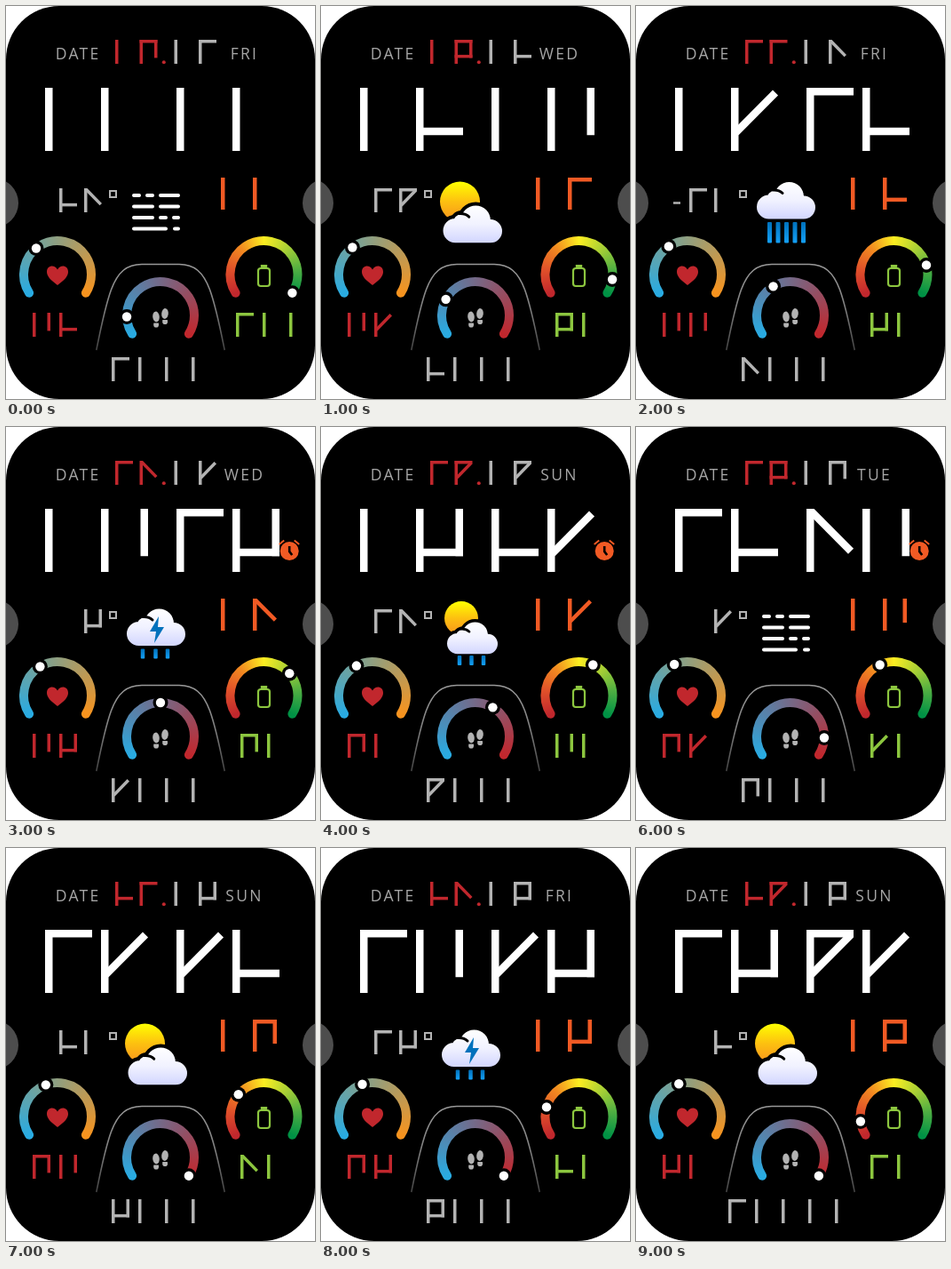
Write an HTML page with a canvas that moves like this. It is 348 px wide and 442 px high and loops after 10 s.

```html
<!DOCTYPE html>
<html lang="en">
<head>
<meta charset="utf-8">
<title>Cipher watch face</title>
<style>
  html, body { margin: 0; width: 100%; height: 100%; overflow: hidden; background: #fff; }
  canvas { display: block; width: 348px; height: 442px; }
</style>
</head>
<body>
<canvas id="face"></canvas>
<script>
const W = 348, H = 442, STEP = 1000, STEPS = 10;
const RED = '#c1272d', GREY = '#b3b3b3', ORANGE = '#f15a24', GREEN = '#8cc63f', BLUE = '#29abe2';
const TEMPS = [23, 15, -10, 8, 13, 7, 4, 20, 18, 2];
const WEATHER = ['fog', 'sun', 'downpour', 'storm', 'sunRain', 'sun', 'fog', 'sun', 'storm', 'sun'];
const DAYS = ['SUN', 'MON', 'TUE', 'WED', 'THU', 'FRI', 'SAT'];
// Marks added to the stem: t top, m middle, r right, d falling, u rising
const MARKS = ['', 't', 'm', 'd', 'u', 'tu', 'r', 'tr', 'mr', 'tmr'];
const SMALL = { w: 20, h: 27, t: 3.5, gap: 30 };
const ARC_START = 147 * Math.PI / 180, ARC_SWEEP = 246 * Math.PI / 180;

const canvas = document.getElementById('face');
const c = canvas.getContext('2d');
const dpr = window.devicePixelRatio || 1;
canvas.width = W * dpr;
canvas.height = H * dpr;
c.scale(dpr, dpr);

function line(color, width, points, cap = 'butt') {
  c.strokeStyle = color;
  c.lineWidth = width;
  c.lineCap = cap;
  c.beginPath();
  points.forEach(([x, y]) => c.lineTo(x, y));
  c.stroke();
}

function disc(color, x, y, r) {
  c.fillStyle = color;
  c.beginPath();
  c.arc(x, y, r, 0, 2 * Math.PI);
  c.fill();
}

function roundRect(x, y, w, h, r) {
  c.beginPath();
  c.roundRect(x, y, w, h, r);
}

function vertical(y0, y1, ...colors) {
  const g = c.createLinearGradient(0, y0, 0, y1);
  colors.forEach((color, i) => g.addColorStop(i / (colors.length - 1), color));
  return g;
}

function digit(value, x, y, { w, h, t }, color) {
  const left = x + t / 2, right = x + w - t / 2, top = y + t / 2, mid = y + h * 0.69;
  const nudge = t * 0.15;
  const strokes = {
    t: [[x, top], [x + w, top]],
    m: [[x, mid], [x + w, mid]],
    r: [[right, y], [right, mid + t / 2]],
    d: [[left + nudge, top - nudge], [right + nudge, mid - nudge]],
    u: [[left + nudge, mid + nudge], [right + nudge, top + nudge]]
  };
  line(color, t, [[left, y], [left, y + h]]);
  for (const mark of MARKS[value]) line(color, t, strokes[mark]);
}

function number(text, x, y, style, color) {
  [...String(text)].forEach((d, i) => digit(+d, x + i * style.gap, y, style, color));
}

const pad = n => String(n).padStart(2, '0');

function label(text, x) {
  c.font = '17.5px "Open Sans", "Noto Sans", sans-serif';
  c.letterSpacing = '2.3px';
  c.textAlign = 'center';
  c.fillStyle = '#a6a6a6';
  c.fillText(text, x + 1.15, 60);
}

// Colours spread evenly along the gauge arc
function arcPaint(x, y, colors) {
  const g = c.createConicGradient(Math.PI / 2, x, y);
  const from = (ARC_START - Math.PI / 2) / (2 * Math.PI), span = ARC_SWEEP / (2 * Math.PI);
  colors.forEach((color, i) => g.addColorStop(from + span * i / (colors.length - 1), color));
  return g;
}

function gauge(x, y, colors, level) {
  const r = 38;
  c.strokeStyle = arcPaint(x, y, colors);
  c.lineWidth = 10;
  c.lineCap = 'round';
  c.beginPath();
  c.arc(x, y, r, ARC_START, ARC_START + ARC_SWEEP);
  c.stroke();
  const a = ARC_START + ARC_SWEEP * Math.min(level, 1);
  const px = x + r * Math.cos(a), py = y + r * Math.sin(a);
  disc('#000', px, py, 8.5);
  disc('#fff', px, py, 5.2);
}

function heart(x, y) {
  c.fillStyle = RED;
  c.beginPath();
  c.moveTo(x, y + 11);
  c.bezierCurveTo(x - 8, y + 5, x - 12, y + 1, x - 12, y - 4);
  c.bezierCurveTo(x - 12, y - 11.5, x - 3, y - 12.5, x, y - 6.5);
  c.bezierCurveTo(x + 3, y - 12.5, x + 12, y - 11.5, x + 12, y - 4);
  c.bezierCurveTo(x + 12, y + 1, x + 8, y + 5, x, y + 11);
  c.fill();
}

function battery(x, y) {
  c.strokeStyle = c.fillStyle = GREEN;
  c.lineWidth = 2.2;
  roundRect(x - 6.5, y - 8, 13, 20, 3);
  c.stroke();
  c.fillRect(x - 3.7, y - 12, 7.4, 4);
}

function foot(x, y, tilt) {
  c.fillStyle = GREY;
  c.beginPath();
  c.ellipse(x, y, 3.8, 5.9, tilt, 0, 2 * Math.PI);
  c.fill();
  roundRect(x - 2.8, y + 7, 5.8, 5, [0.5, 0.5, 2.8, 2.8]);
  c.fill();
}

function cloud(x, y, w, outlined) {
  const s = w / 66;
  const shape = new Path2D();
  const lobe = (cx, cy, r) => {
    shape.moveTo(cx + r, cy);
    shape.arc(cx, cy, r, 0, 2 * Math.PI);
  };
  lobe(13.5, 28.5, 13.5);
  lobe(21, 20, 10);
  lobe(36.5, 17, 16.5);
  lobe(53, 29, 13);
  shape.rect(13.5, 20, 39.5, 22);
  c.save();
  c.translate(x, y);
  c.scale(s, s);
  if (outlined) {
    c.strokeStyle = '#000';
    c.lineWidth = 8;
    c.stroke(shape);
  }
  c.fillStyle = vertical(0, 42, '#fff', '#f1f2ff', '#d2d6ff');
  c.fill(shape);
  c.strokeStyle = '#000';
  c.lineWidth = 3;
  c.lineCap = 'round';
  c.beginPath();
  c.moveTo(18, 9.5);
  c.quadraticCurveTo(25, 9, 29, 13);
  c.stroke();
  c.restore();
}

function sun(x, y, r) {
  disc(vertical(y - r, y + r, '#ffff00', '#fdc010', '#f7931e'), x, y, r);
}

function rain(xs, y, h, w) {
  c.fillStyle = vertical(y, y + h, '#0071bc', '#14a0f5');
  xs.forEach(x => {
    roundRect(x - w / 2, y, w, h, 1);
    c.fill();
  });
}

const weather = {
  fog() {
    const rows = [[[142, 152], [157, 167], [172, 196]], [[142, 167], [172, 196]],
                  [[142, 167], [172, 182], [187, 196]], [[142, 182], [188, 196]]];
    rows.forEach((row, i) => row.forEach(([a, b]) => {
      const y = 213 + i * 12.5;
      line('#fff', 4, [[a + 2, y], [b - 2, y]], 'round');
    }));
  },
  sun() {
    sun(156.5, 220, 22.5);
    cloud(137.5, 224, 66.5, true);
  },
  downpour() {
    cloud(136, 197.5, 66);
    rain([150.5, 160, 169.5, 179, 188.5], 243, 23.5, 5);
  },
  sunRain() {
    sun(158, 215, 19);
    cloud(142, 219, 57, true);
    rain([156, 169.5, 183], 257, 11, 4.5);
  },
  storm() {
    cloud(136, 204, 66);
    c.fillStyle = '#0071bc';
    c.beginPath();
    [[172, 213], [162, 230], [169, 230], [167, 243], [178, 225], [171, 225]]
      .forEach(p => c.lineTo(...p));
    c.fill();
    rain([154, 168.5, 182], 249.5, 11, 4.5);
  }
};

function alarm(x, y) {
  disc(ORANGE, x, y, 10.5);
  line('#000', 2.6, [[x, y - 5.5], [x, y + 0.5], [x + 3, y + 4.5]]);
  line(ORANGE, 2, [[x - 11.5, y - 7.5], [x - 6, y - 12]]);
  line(ORANGE, 2, [[x + 11, y - 7.5], [x + 5.5, y - 12]]);
}

function temperature(value) {
  const text = String(Math.abs(value));
  number(text, 88 - (text.length - 1) * 28, 205, { ...SMALL, gap: 28 }, GREY);
  if (value < 0) line(GREY, 2.5, [[42, 221.5], [50, 221.5]]);
  c.strokeStyle = GREY;
  c.lineWidth = 2;
  c.strokeRect(117, 208, 7, 7);
}

function body() {
  c.clearRect(0, 0, W, H);
  c.fillStyle = '#000';
  roundRect(0, 0, W, H, 60);
  c.fill();
  disc('#4d4d4d', -13.6, 221.5, 27.6);
  disc('#4d4d4d', W + 13.6, 221.5, 27.6);
  c.strokeStyle = vertical(290, 390, '#999', '#808080', '#404040');
  c.lineWidth = 1.6;
  c.beginPath();
  c.moveTo(101.8, 387);
  c.bezierCurveTo(107, 361, 111.5, 338, 118.5, 319);
  c.bezierCurveTo(126, 299, 136, 290.5, 153, 290.5);
  c.lineTo(195, 290.5);
  c.bezierCurveTo(212, 290.5, 222, 299, 229.5, 319);
  c.bezierCurveTo(236.5, 338, 241, 361, 246.2, 387);
  c.stroke();
}

function draw(i) {
  const day = 7 + 2 * i, month = Math.min(i + 1, 9);
  const pulse = 62 + 2 * i, charge = 100 - 10 * i, walked = 1000 * (i + 1);
  const dateStyle = { ...SMALL, gap: 27.5 };
  const timeStyle = { w: 53, h: 71, t: 8.5, gap: 63 };

  body();
  label('DATE', 80);
  label(DAYS[new Date(2022, month - 1, day).getDay()], 267.3);
  number(pad(day), 123, 38, dateStyle, RED);
  disc(RED, 177.8, 63.3, 2);
  number(pad(month), 189.5, 38, dateStyle, GREY);

  number(pad(2 * i), 44, 92, timeStyle, '#fff');
  number(pad(6 * i), 192, 92, timeStyle, '#fff');
  if (i >= 3 && i <= 6) alarm(319.2, 139.5);
  number(pad(i), 242, 193, { w: 27, h: 36, t: 4.5, gap: 36 }, ORANGE);

  temperature(TEMPS[i]);
  weather[WEATHER[i]]();

  gauge(58, 302, [BLUE, '#f7931e'], pulse / 182);
  heart(58, 303);
  number(pulse, 30, 345, SMALL, RED);

  gauge(290.5, 302, [RED, '#e0502a', '#f28a20', '#fcee21', '#a9d035', '#4fae42', '#009245'], charge / 100);
  battery(290.5, 303);
  number(charge, charge === 100 ? 259 : 264, 345, SMALL, GREEN);

  gauge(174, 348, [BLUE, RED], walked / 8000);
  foot(169, 349.5, -0.12);
  foot(179, 346, 0.12);
  number(walked, walked < 10000 ? 119 : 104, 395, SMALL, GREY);
}

let shown = -1;
function tick(now) {
  const i = Math.floor(now / STEP) % STEPS;
  if (i !== shown) draw(shown = i);
  requestAnimationFrame(tick);
}
tick(0);
</script>
</body>
</html>
```
